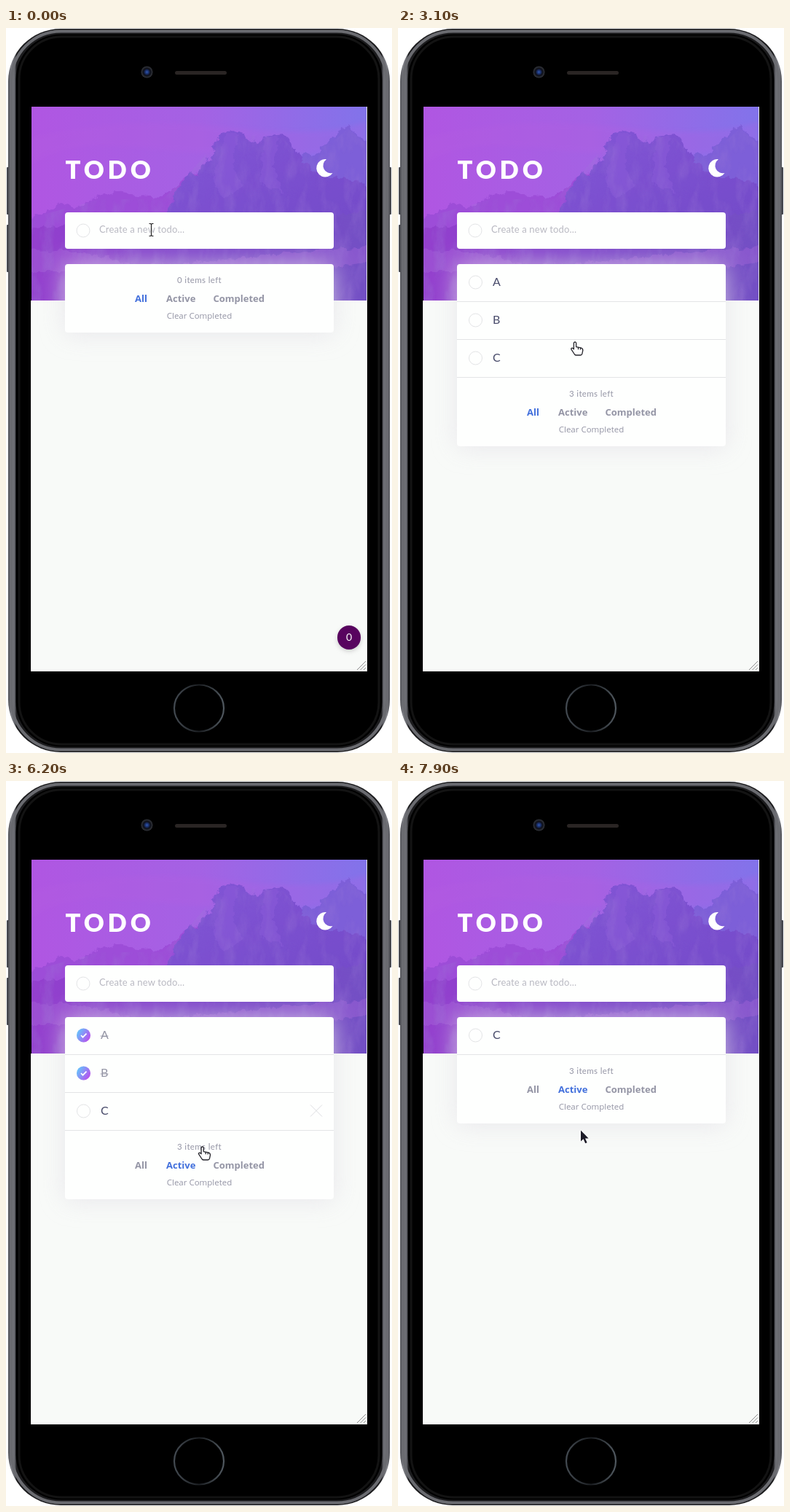
Write an HTML page that moves like this. It is 530 px wide and 995 px high and loops after 8 s.

```html
<!DOCTYPE html>
<html lang="en">
<head>
<meta charset="utf-8">
<title>Todo app</title>
<style>
  html, body { margin: 0; width: 100%; height: 100%; overflow: hidden; background: #fff; }
  svg { display: block; width: 100%; height: 100%; }
  text { font-family: Lato, sans-serif; white-space: pre; }
  .title { font-size: 34.5px; font-weight: 900; letter-spacing: 4.8px; fill: #fff; }
  .field { font-size: 13px; letter-spacing: .15px; }
  .count { font-size: 11.5px; letter-spacing: .35px; fill: #9495a5; text-anchor: middle; }
  .link { font: 700 13px "Open Sans", "Noto Sans", sans-serif; }
  .clear { font: 11.5px "Open Sans", "Noto Sans", sans-serif; text-anchor: middle; }
  .item { font-size: 16px; }
  .ring { fill: #fefffe; stroke: #e3e4e6; }
</style>
</head>
<body>
<svg viewBox="0 0 530 995" xmlns="http://www.w3.org/2000/svg">
  <defs>
    <linearGradient id="metal">
      <stop offset="0" stop-color="#4a4b50"/><stop offset=".008" stop-color="#808187"/>
      <stop offset=".017" stop-color="#66676d"/><stop offset=".022" stop-color="#1c1c1e"/>
      <stop offset=".978" stop-color="#1c1c1e"/><stop offset=".983" stop-color="#66676d"/>
      <stop offset=".992" stop-color="#808187"/><stop offset="1" stop-color="#4a4b50"/>
    </linearGradient>
    <linearGradient id="sky">
      <stop offset="0" stop-color="#b056e2"/><stop offset=".5" stop-color="#a462e4"/>
      <stop offset="1" stop-color="#8273ea"/>
    </linearGradient>
    <linearGradient id="rock" x2=".6" y2="1">
      <stop offset="0" stop-color="#8355d6"/><stop offset="1" stop-color="#7049c6"/>
    </linearGradient>
    <linearGradient id="ground">
      <stop offset="0" stop-color="#953fce"/><stop offset=".45" stop-color="#8046cb"/>
      <stop offset="1" stop-color="#7250c4"/>
    </linearGradient>
    <linearGradient id="tick" x2="1" y2=".6">
      <stop offset="0" stop-color="#57d6ff"/><stop offset="1" stop-color="#b653ee"/>
    </linearGradient>
    <linearGradient id="home">
      <stop offset="0" stop-color="#434a51"/><stop offset=".5" stop-color="#1c1f23"/>
      <stop offset="1" stop-color="#50585f"/>
    </linearGradient>
    <radialGradient id="lens">
      <stop offset="0" stop-color="#2f58b0"/><stop offset=".3" stop-color="#1c3270"/>
      <stop offset=".6" stop-color="#0d0f18"/><stop offset="1" stop-color="#35373d"/>
    </radialGradient>
    <filter id="ragged" x="-5%" y="-5%" width="110%" height="110%">
      <feTurbulence type="fractalNoise" baseFrequency=".09" numOctaves="3" seed="4"/>
      <feDisplacementMap in="SourceGraphic" scale="12" xChannelSelector="R" yChannelSelector="G"/>
    </filter>
    <filter id="grain" x="0" y="0" width="100%" height="100%">
      <feTurbulence type="fractalNoise" baseFrequency=".06 .025" numOctaves="4" seed="9"/>
      <feColorMatrix values="0 0 0 0 .34  0 0 0 0 .2  0 0 0 0 .68  1.600 0 0 0 -.660"/>
    </filter>
    <filter id="blur" x="-30%" y="-80%" width="160%" height="260%"><feGaussianBlur stdDeviation="17"/></filter>
    <filter id="soft" x="-50%" y="-50%" width="200%" height="200%"><feGaussianBlur stdDeviation="3"/></filter>
    <clipPath id="screen"><rect x="35" y="108" width="461" height="775"/></clipPath>
    <clipPath id="banner"><rect x="35" y="108" width="460" height="266"/></clipPath>
    <clipPath id="rocks">
      <path d="M35 260 130 235 215 235 250 202 290 155 322 146 380 151 404 177 450 155 470 138 495 160V374H35z"/>
    </clipPath>
  </defs>

  <!-- phone -->
  <g fill="#45464c">
    <rect x="1" y="191" width="5" height="65" rx="1"/>
    <rect x="1" y="270" width="5" height="65" rx="1"/>
    <rect x="524" y="191" width="5" height="65" rx="1"/>
  </g>
  <rect x="3" y="1" width="524" height="993" rx="72" fill="url(#metal)"/>
  <rect x="7.500" y="4.500" width="515" height="986" rx="68" fill="none" stroke="#6a6b70" stroke-width="4"/>
  <rect x="13.500" y="8.500" width="503" height="978" rx="62"/>
  <rect x="18" y="12" width="494" height="971" rx="58" fill="none" stroke="#131313" stroke-width="3"/>
  <circle cx="193.500" cy="60.500" r="8" fill="url(#lens)"/>
  <rect x="232" y="59" width="71" height="5" rx="2.500" fill="#2a2524"/>
  <ellipse cx="265" cy="933.500" rx="34" ry="32" stroke="url(#home)" stroke-width="2.200"/>

  <g clip-path="url(#screen)">
    <path d="M35 108h461v775H35z" fill="#f8faf8"/>
    <g clip-path="url(#banner)">
      <path d="M35 108h460v266H35z" fill="url(#sky)"/>
      <path d="M35 150Q160 120 300 136T495 128V170Q330 180 200 166T35 190z" fill="#b45ee0" opacity=".25" filter="url(#soft)"/>
      <g filter="url(#ragged)">
        <path d="M30 262 60 250 78 240 96 246 122 233 150 226 182 230 215 232 245 205 290 190V380H30z" fill="#9d4dd8"/>
        <path d="M385 200 410 170 424 176 438 158 452 150 460 138 470 132 482 149 500 156V380H385z" fill="#7d5ed8"/>
        <path d="M215 265 240 212 252 197 262 203 272 182 284 174 290 151 302 142 322 141 332 154 346 158 354 149 382 146 394 158 406 182 430 200 500 215V380H215z" fill="url(#rock)"/>
        <path d="M302 143 318 145 310 185 325 215 300 235 284 210zM354 150 376 149 366 190 380 225 350 214z" fill="#8c5cda" opacity=".5"/>
        <path d="M25 278 70 270 120 276 190 264 260 270 340 258 420 264 505 250V385H25z" fill="url(#ground)"/>
        <path d="M30 306Q90 300 140 316T300 318T500 300V322Q400 338 300 336T30 334z" fill="#a968da" opacity=".4"/>
      </g>
      <g clip-path="url(#rocks)"><path d="M35 125h460v249H35z" filter="url(#grain)" opacity=".45"/></g>
    </g>
    <text class="title" x="81.500" y="206.500">TODO</text>
    <path d="M440 180.200A10.500 10.500 0 0 0 448.600 199A12.200 12.200 0 1 1 440 180.200z" fill="#fff"/>

    <rect id="shade" x="81" y="326" width="369" rx="4" fill="#e4e2e8" opacity=".8" filter="url(#blur)"/>
    <rect x="81" y="253" width="369" height="50" rx="4" fill="#fefffe"/>
    <circle class="ring" cx="106" cy="278" r="9"/>
    <text class="field" id="field" x="128" y="281"></text>
    <path id="caret" d="M.5 270v15" stroke="#494c6b" stroke-width="1.200"/>

    <rect id="card" x="81" y="324" width="369" rx="4" fill="#fefffe"/>
    <g id="list"></g>
    <g id="footer">
      <text class="count" id="count" x="265.500" y="350"></text>
      <text class="link" id="all" x="177" y="376">All</text>
      <text class="link" id="active" x="220" y="376">Active</text>
      <text class="link" id="completed" x="284.500" y="376">Completed</text>
      <text class="clear" id="clear" x="265.500" y="399">Clear Completed</text>
    </g>
    <g id="badge">
      <circle cx="471" cy="839" r="16" fill="#999" opacity=".5" filter="url(#soft)"/>
      <rect x="455" y="820" width="32" height="33" rx="16" fill="#58045f"/>
      <text x="471" y="841" font-size="14" fill="#fff" text-anchor="middle">0</text>
    </g>
    <path d="M482 881 494 869M486.500 881 494 873.500M491 881 494 878" stroke="#8c8c8c"/>
  </g>
  <path d="M495.500 108V883M34.500 374V883" stroke="#e6e8e6"/>

  <g id="cursor">
    <g id="ibeam" fill="none">
      <path d="M-3-8.500h2l1 1 1-1h2M0-7.500v15M-3 8.500h2l1-1 1 1h2" stroke="#fff" stroke-width="2.600" opacity=".7"/>
      <path d="M-3-8.500h2l1 1 1-1h2M0-7.500v15M-3 8.500h2l1-1 1 1h2" stroke="#222" stroke-width="1.200"/>
    </g>
    <path id="hand" d="M0 0q1.600 0 1.600 1.600v5l6.400 1.300q3 .8 2.800 3.800l-1 4.500q-.4 1.800-2.300 1.800H1.500q-1.200 0-2-1L-5 10.200q-.7-1.400.6-1.900 1-.3 1.800.5l1 1V1.600Q-1.600 0 0 0zM4.500 7.200v3M7.500 7.800v2.800" fill="#fff" stroke="#25252b" stroke-width="1.300" stroke-linejoin="round"/>
    <path id="arrow" d="M0 0v15l3.600-3.200 2.600 6 2.400-1-2.600-5.800h4.600z" fill="#1b1a26" stroke="#fff" stroke-width=".9" paint-order="stroke"/>
  </g>
</svg>
<script>
const LOOP = 8000, TICK = 100, FADE = 300, ROW = 52;
const GREY = [148, 149, 165], BLUE = [66, 112, 220], DARK = [73, 76, 107];
const $ = id => document.getElementById(id);
const set = (el, attrs) => { for (const k in attrs) el.setAttribute(k, attrs[k]); };
const show = (el, on) => { el.style.display = on ? '' : 'none'; };

// Tracks are [time, value] steps.
const typed = [[0, ''], [1300, 'A'], [1800, ''], [2000, 'B'], [2100, ''], [2300, 'C'], [2500, '']];
const caretOn = [[0, false], [500, true], [1600, false], [1800, true], [2700, false]];
const badgeOn = [[0, true], [2800, false]];
const shown = [[0, ''], [1800, 'A'], [2100, 'AB'], [2500, 'ABC'], [6700, 'AB'], [7500, 'C']];
const total = [[0, 0], [1800, 1], [2100, 2], [2500, 3]];
const doneAt = { A: 4900, B: 5700, C: LOOP };
const cross = {
  A: [[0, [0]], [4700, [1]], [5000, [0]]],
  B: [[0, [0]], [4600, [1]], [4700, [0]], [5100, [1]], [5900, [0]]],
  C: [[0, [0]], [4500, [1]], [4600, [0]], [6000, [1]], [6200, [0]]]
};
const tint = {
  all: [[0, BLUE], [3700, GREY]],
  active: [[0, GREY], [3400, DARK], [3500, GREY], [3600, DARK], [3700, BLUE], [6700, GREY], [7200, DARK], [7500, BLUE]],
  completed: [[0, GREY], [6200, DARK], [6700, BLUE], [7500, GREY]],
  clear: [[0, GREY], [3500, DARK], [3600, GREY]]
};
const pointer = [[0, 'ibeam'], [3100, 'hand'], [5200, 'arrow'], [5500, 'hand'], [6700, 'arrow'], [7100, 'hand'], [7500, 'arrow']];
const path = [
  [0, 199.5, 277], [2600, 199.5, 277], [2900, 215, 298], [3000, 215, 298], [3100, 243, 431],
  [3300, 244, 500], [3500, 244, 553], [3600, 244, 536], [3900, 243, 522], [4300, 241, 524],
  [4500, 185, 455], [4700, 120, 370], [4800, 108, 347], [5100, 108, 349], [5300, 118, 417],
  [5400, 118, 417], [5500, 109, 401], [5800, 108, 400], [6000, 165, 448], [6300, 322, 529],
  [6700, 324, 527], [6900, 310, 517], [7200, 250, 477], [7900, 251, 479.5]
];

const indexAt = (track, t) => track.findLastIndex(step => step[0] <= t);
const at = (track, t) => track[indexAt(track, t)][1];
const mix = (a, b, p) => a.map((v, i) => v + (b[i] - v) * p);

function fade(track, t) {
  const i = indexAt(track, t), [start, value] = track[i];
  return i ? mix(track[i - 1][1], value, Math.min(1, (t - start) / FADE)) : value;
}

function position(t) {
  const i = indexAt(path, t), from = path[i], to = path[i + 1] || from;
  const p = to === from ? 0 : (t - from[0]) / (to[0] - from[0]);
  return mix(from.slice(1), to.slice(1), p);
}

$('list').innerHTML = [...'ABC'].map(name => `
  <g id="row${name}">
    <circle class="ring" cx="106.5" cy="349" r="9"/>
    <g class="tick">
      <circle cx="106.5" cy="349" r="9.5" fill="url(#tick)"/>
      <path d="M103 349l2.500 2.600 5-5" fill="none" stroke="#fff" stroke-width="1.800"/>
      <path d="M129.500 350h11" stroke="#9495a5" stroke-width=".8"/>
    </g>
    <text class="item" x="130" y="354">${name}</text>
    <path class="cross" d="M418 340.500l16 16m0-16l-16 16" stroke="#dcdde1"/>
    <path d="M81 375.500h369" stroke="#e3e4e6"/>
  </g>`).join('');

function draw(t) {
  const text = at(typed, t), names = at(shown, t), offset = names.length * ROW;

  $('field').textContent = text || 'Create a new todo...';
  set($('field'), { fill: text ? '#494c6b' : '#b9b9c2' });
  show($('caret'), at(caretOn, t));
  set($('caret'), { transform: `translate(${text ? 136.5 : 128})` });

  set($('card'), { height: 94 + offset });
  set($('shade'), { height: 94 + offset });
  set($('footer'), { transform: `translate(0 ${offset})` });
  $('count').textContent = at(total, t) + ' items left';
  for (const id in tint) set($(id), { fill: `rgb(${fade(tint[id], t).map(Math.round)})` });

  for (const name of 'ABC') {
    const row = $('row' + name), slot = names.indexOf(name), done = t >= doneAt[name];
    show(row, slot >= 0);
    set(row, { transform: `translate(0 ${slot * ROW})` });
    show(row.querySelector('.tick'), done);
    set(row.querySelector('.item'), { fill: done ? '#9495a5' : '#494c6b' });
    set(row.querySelector('.cross'), { opacity: fade(cross[name], t)[0] });
  }

  show($('badge'), at(badgeOn, t));
  for (const kind of ['ibeam', 'hand', 'arrow']) show($(kind), at(pointer, t) === kind);
  set($('cursor'), { transform: `translate(${position(t)})` });
}

const began = performance.now();
let last = -1;
function frame() {
  const t = Math.floor((performance.now() - began) % LOOP / TICK) * TICK;
  if (t !== last) draw(last = t);
  requestAnimationFrame(frame);
}
frame();
</script>
</body>
</html>
```
